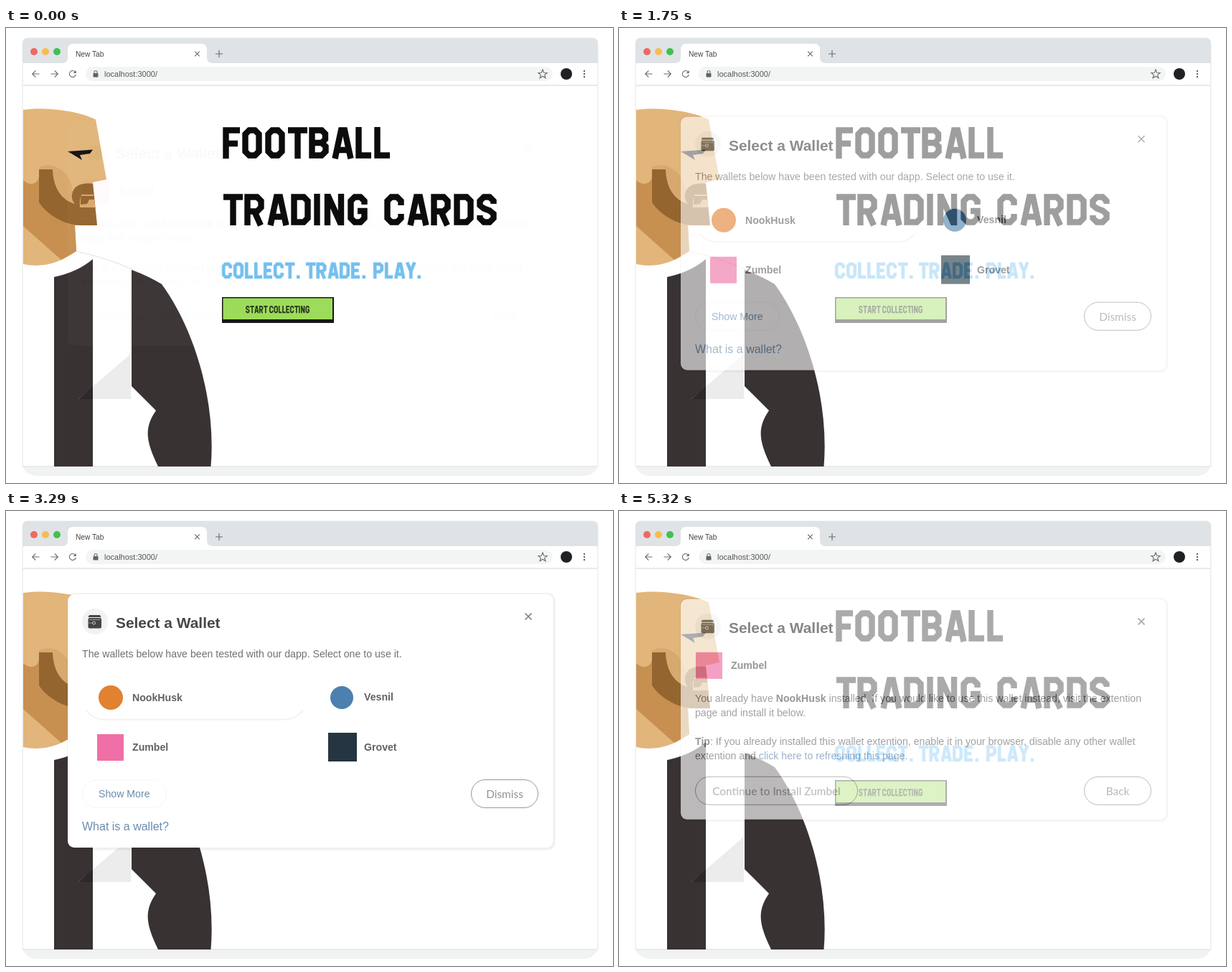
Animation of 846 by 634 pixels, one loop 5.39 s. Source, as an HTML page:

```html
<!DOCTYPE html>
<html lang="en">
<head>
<meta charset="utf-8">
<title>Football trading cards</title>
<style>
  html, body { margin: 0; width: 100%; height: 100%; overflow: hidden; background: #fff; }
  svg { display: block; }
  text { font: 14.15px "Liberation Sans", Arial, sans-serif; fill: #717171; white-space: pre; }
  .bold { font-weight: 700; fill: #626262; }
  .title { font-size: 20.9px; font-weight: 700; fill: #474747; }
  .link { fill: #6a8bb0; }
  .big { font-size: 16px; }
  .btn text { font: 15.4px Lato, sans-serif; fill: #939393; text-anchor: middle; }
  .btn rect { fill: none; stroke: #979797; }
  .card { fill: #fff; }
  .edge { fill: #000; fill-opacity: .055; }
  .line { fill: none; stroke: #686c70; stroke-width: 1.15; }
  .glyphs { fill: none; stroke-width: 8.4; stroke-miterlimit: 3; }
  .modal { opacity: 0; }
</style>
</head>
<body>
<svg id="stage" width="846" height="634" viewBox="0 0 846 634">
  <defs>
    <clipPath id="page"><rect x="24" y="81" width="800" height="530"/></clipPath>
    <g id="head">
      <circle cx="124" cy="154" r="18" fill="#f2f2f2"/>
      <g fill="#444">
        <path d="M116 145H131L132.500 148H114.500Z"/>
        <rect x="114.500" y="149" width="18.500" height="14.500" rx="2"/>
      </g>
      <path d="M116 151.500H131M114.500 156H121" stroke="#aaa" stroke-width=".8"/>
      <circle cx="122.500" cy="156" r="2" fill="#444" stroke="#ddd" stroke-width=".9"/>
      <text class="title" x="153" y="163">Select a Wallet</text>
      <path d="M723.500 142.500L732.500 151.500M732.500 142.500L723.500 151.500" stroke="#7c7c7c" stroke-width="1.600"/>
    </g>
  </defs>

  <!-- window -->
  <rect x="23" y="590" width="802" height="34" rx="20" fill="#f1f2f2"/>
  <path d="M22.500 612V22Q22.500 13.500 31 13.500H817Q825.500 13.500 825.500 22V612Z" fill="#eceded"/>
  <path d="M24 610V49H824V610Z" fill="#fff"/>
  <path d="M23 49V22Q23 14 31 14H817Q825 14 825 22V49Z" fill="#dfe3e6"/>
  <path d="M78 49Q86 49 86 41V30Q86 22 94 22H272Q280 22 280 30V41Q280 49 288 49Z" fill="#fff"/>
  <circle cx="39" cy="33" r="5" fill="#ed6a5e"/>
  <circle cx="55" cy="33" r="5" fill="#f5bd4f"/>
  <circle cx="71" cy="33" r="5" fill="#3fc150"/>
  <text x="97" y="40" style="font-size:10.2px;fill:#454545">New Tab</text>
  <g class="line">
    <path d="M263.200 32.700L269.800 39.300M269.800 32.700L263.200 39.300M292 36H302M297 31V41"/>
    <path d="M46.500 64H36.700M41.300 59.400L36.700 64L41.300 68.600M62.500 64H72.300M67.700 59.400L72.300 64L67.700 68.600"/>
    <path d="M96.300 61A4.500 4.500 0 1 0 97.300 65"/>
  </g>
  <path d="M97.700 59V63H93.700Z" fill="#686c70"/>
  <rect x="111" y="54" width="651" height="20" rx="10" fill="#f3f5f5"/>
  <rect x="121.500" y="63" width="7" height="5.500" rx="1" fill="#5f6368"/>
  <path class="line" d="M123 63V61.500A2 2 0 0 1 127 61.500V63"/>
  <text x="137" y="68" style="font-size:11px;fill:#55575a">localhost:3000/</text>
  <path class="line" d="M748 58L749.700 62.200L754.200 62.500L750.700 65.400L751.900 69.800L748 67.300L744.100 69.800L745.300 65.400L741.800 62.500L746.300 62.200Z"/>
  <circle cx="781" cy="64" r="8" fill="#202124"/>
  <g fill="#5f6368"><circle cx="806" cy="60" r="1.200"/><circle cx="806" cy="64" r="1.200"/><circle cx="806" cy="68" r="1.200"/></g>
  <path d="M24 80H824" stroke="#e8e9e9" stroke-width="2"/>
  <path d="M24 611H824" stroke="#e9eaea" stroke-width="2"/>

  <!-- player -->
  <g clip-path="url(#page)">
    <path d="M24 114C50 109.500 100 114.500 125 127.500L140 211L121 215L127 275H96L98 311Q62 337 24 329Z" fill="#e2b57a"/>
    <path d="M24 212Q30 218 37 217Q45 215 46 207L60 250L127 275H96L98 311L77 323L24 276Z" fill="#c79051"/>
    <path d="M46 194C62 186 87 196 92 222L95 244C80 240 66 225 65 197H46Z" fill="#d8a96e"/>
    <path d="M46 197H65C66 224 78 240 96 245Q91 240 92 232C94 219 106 215 121 217L127 275H108C82 276 57 260 46 243Z" fill="#94652f"/>
    <path d="M122 232H106Q102 234 103 250H124.500Z" fill="#d8a96e"/>
    <path d="M104 234H123V239H116L113 245L104 246Z" fill="#94652f"/>
    <path d="M86 172L121 169.500L117 175L103 177L106 184Q98 179 86 172Z" fill="#111"/>
    <path d="M98 311Q160 324 217 357" fill="none" stroke="#e9dfd3"/>
    <g fill="#383233">
      <path d="M67 347Q100 340 121 322V611H67Z"/>
      <path d="M175 337Q199 346 217 357C263 420 293 520 285.500 611H212C195 576 192 558 209 533L175 499Z"/>
    </g>
    <path d="M174 454V517H101Z" fill="#ececec"/>
    <path d="M121 499V517H101Z" fill="#2d2829"/>
  </g>

  <!-- hero -->
  <rect x="301" y="375" width="156" height="36" fill="#111"/>
  <rect x="302.500" y="376.500" width="152.500" height="29.500" fill="#9bdc56"/>
  <g id="hero" class="glyphs"></g>

  <g id="pick" class="modal">
    <rect class="edge" x="85" y="114" width="680.500" height="358.500" rx="11"/>
    <rect class="card" x="86" y="116" width="676.500" height="353" rx="9"/>
    <use href="#head"/>
    <text x="106" y="204">The wallets below have been tested with our dapp. Select one to use it.</text>
    <path d="M112 278Q121 290.500 138 290.500H387Q404 290.500 413 278" fill="none" stroke="#f2f2f2" stroke-width="2"/>
    <circle cx="146" cy="260" r="17" fill="#e2812f"/>
    <text class="bold" x="176" y="265">NookHusk</text>
    <circle cx="468" cy="260" r="16" fill="#4d80ae"/>
    <text class="bold" x="499" y="264">Vesnil</text>
    <rect x="127" y="311" width="37" height="37" fill="#ef6fa6"/>
    <text class="bold" x="176" y="334">Zumbel</text>
    <rect x="449" y="309" width="40" height="40" fill="#253541"/>
    <text class="bold" x="499" y="334">Grovet</text>
    <rect x="106.500" y="374.500" width="117" height="39" rx="19.500" fill="none" stroke="#f4f6f8"/>
    <text class="link" x="129" y="399">Show More</text>
    <g class="btn">
      <rect x="648.500" y="374.500" width="93" height="39" rx="19.500"/>
      <text x="695" y="400">Dismiss</text>
    </g>
    <text class="link big" x="106" y="445">What is a wallet?</text>
  </g>

  <g id="install" class="modal">
    <rect class="edge" x="85" y="114" width="680.500" height="312.500" rx="11"/>
    <rect class="card" x="86" y="116" width="676.500" height="307" rx="9"/>
    <use href="#head"/>
    <rect x="107" y="190" width="37" height="37" fill="#ef6fa6"/>
    <text class="bold" x="156" y="213">Zumbel</text>
    <text x="106" y="259">You already have <tspan class="bold">NookHusk</tspan> installed. If you would like to use this wallet instead, visit the extention</text>
    <text x="106" y="279">page and install it below.</text>
    <text x="106" y="319"><tspan class="bold">Tip</tspan>: If you already installed this wallet extention, enable it in your browser, disable any other wallet</text>
    <text x="106" y="339">extention and <tspan class="link">click here to refreshing this page</tspan>.</text>
    <g class="btn">
      <rect x="106.500" y="363.500" width="226" height="39" rx="19.500"/>
      <text x="219.500" y="389">Continue to Install Zumbel</text>
      <rect x="648.500" y="363.500" width="93" height="39" rx="19.500"/>
      <text x="695" y="389">Back</text>
    </g>
  </g>
</svg>
<script>
  // Block lettering: advance and centre-line path on a 44-unit cap height.
  const GLYPHS = {
    A: [33, 'M4.5 44L13 4.5H18L26.5 44M8 32H23'],
    B: [32, 'M4.5 4.5H18L23 9.5V17L18 22L23.5 27V34L18 39.5H4.5ZM4.5 22H18'],
    C: [32, 'M23.5 16V10L18 4.5H10L4.5 10V34L10 39.5H18L23.5 34V28'],
    D: [32, 'M4.5 4.5H18L23.5 10V34L18 39.5H4.5Z'],
    E: [28, 'M24 4.5H4.5V39.5H24M4.5 22H21'],
    F: [27, 'M4.5 44V4.5H24M4.5 23H21'],
    G: [32, 'M23.5 15V10L18 4.5H10L4.5 10V34L10 39.5H18L23.5 34V24H14'],
    I: [14.5, 'M4.5 0V44'],
    L: [26, 'M4.5 0V39.5H22'],
    N: [32.5, 'M4.5 44V0M23.5 44V0M5 2L23 42'],
    O: [32, 'M10 4.5H18L23.5 10V34L18 39.5H10L4.5 34V10Z'],
    P: [32, 'M4.5 44V4.5H18L23.5 10V20L18 25.5H4.5'],
    R: [32, 'M4.5 44V4.5H18L23.5 10V19L18 24.5H4.5M14 24L23 44'],
    S: [32, 'M23.5 14V10L18 4.5H10L4.5 10V16L10 20.5L18 23.5L23.5 28V34L18 39.5H10L4.5 34V30'],
    T: [29, 'M0 4.5H27M13.5 4.5V44'],
    Y: [29, 'M3 0L13.5 24L24 0M13.5 22V44'],
    '.': [14, 'M3 39.5H12']
  };

  const hero = document.getElementById('hero');

  function lettering(word, x, y, color, sx = 1, sy = sx, halo = '') {
    let pen = 0, paths = '';
    for (const ch of word) {
      const [advance, d] = GLYPHS[ch];
      paths += `<path transform="translate(${pen})" d="${d}"/>`;
      pen += advance;
    }
    const place = `transform="translate(${x} ${y}) scale(${sx} ${sy})"`;
    const under = halo ? `<g ${place} stroke="${halo}" stroke-width="12">${paths}</g>` : '';
    hero.insertAdjacentHTML('beforeend',
      `${under}<g ${place} stroke="${color}" role="img" aria-label="${word}">${paths}</g>`);
  }

  lettering('FOOTBALL', 302, 138, '#060606');
  lettering('TRADING', 303, 231, '#060606');
  lettering('CARDS', 527, 231, '#060606');
  for (const [word, x] of [['COLLECT.', 301], ['TRADE.', 418], ['PLAY.', 512]])
    lettering(word, x, 326.5, '#70bff0', .5, .515, '#dceffb');
  lettering('START', 334, 387, '#26381a', .2, .235);
  lettering('COLLECTING', 367, 387, '#26381a', .2, .235);

  const LOOP = 5390, STEP = 70, SPAN = 6000;

  // Steps of [ms, visibility]; a modal rises 20px as it fades in.
  function track(id, steps) {
    const frames = steps.map(([ms, p]) => ({
      offset: ms / SPAN,
      opacity: p,
      transform: `translateY(${20 * (1 - p)}px)`,
      easing: 'ease'
    }));
    const anim = document.getElementById(id).animate(frames, { duration: SPAN, fill: 'both' });
    anim.pause();
    return anim;
  }

  const tracks = [
    track('pick', [[0, 0], [1572, 0], [2072, 1], [3410, 1], [3910, 0], [SPAN, 0]]),
    track('install', [[0, .03], [140, 0], [3410, 0], [3910, 1], [5210, 1], [5710, 0], [SPAN, 0]])
  ];

  const start = performance.now();
  function draw() {
    const t = (performance.now() - start) % LOOP;
    const held = Math.floor(t / STEP) * STEP;
    for (const anim of tracks) anim.currentTime = held;
    requestAnimationFrame(draw);
  }
  draw();
</script>
</body>
</html>
```
